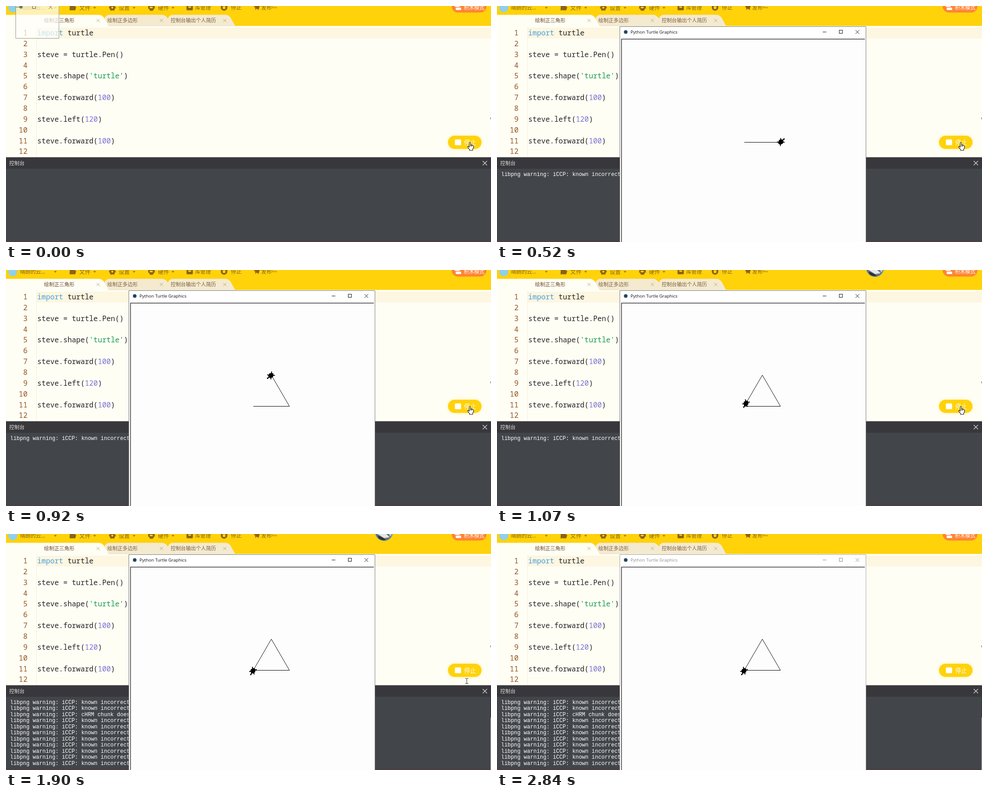
An HTML page with a canvas that plays this animation: 1072 by 522 pixels, repeating every 2940 ms.

```html
<!DOCTYPE html>
<html lang="zh-CN">
<head>
<meta charset="utf-8">
<title>Turtle triangle</title>
<style>
html, body { margin: 0; width: 100%; height: 100%; overflow: hidden; background: #fffef5; }
canvas { display: block; }
</style>
</head>
<body>
<canvas id="stage" width="1072" height="522"></canvas>
<script>
const ctx = document.getElementById('stage').getContext('2d');
const LOOP = 2940;
const CJK = '"Noto Sans CJK SC", "Noto Sans CJK", sans-serif';
const CODE = '"Noto Sans Mono", monospace';
const TERM = '"Liberation Mono", monospace';
const UI = '"Open Sans", "Noto Sans", sans-serif';
const YELLOW = '#ffd20a', BROWN = '#8b6414', PAPER = '#fffef5';

function rect(x, y, w, h, color) {
  ctx.fillStyle = color;
  ctx.fillRect(x, y, w, h);
}

function pill(x, y, w, h, r, color) {
  ctx.fillStyle = color;
  ctx.beginPath();
  ctx.roundRect(x, y, w, h, r);
  ctx.fill();
}

function disc(x, y, r, color) {
  ctx.fillStyle = color;
  ctx.beginPath();
  ctx.arc(x, y, r, 0, Math.PI * 2);
  ctx.fill();
}

function poly(points, color) {
  ctx.fillStyle = color;
  ctx.beginPath();
  points.forEach(([x, y]) => ctx.lineTo(x, y));
  ctx.closePath();
  ctx.fill();
}

function stroke(points, color, width = 1) {
  ctx.strokeStyle = color;
  ctx.lineWidth = width;
  ctx.beginPath();
  points.forEach(([x, y], i) => i ? ctx.lineTo(x, y) : ctx.moveTo(x, y));
  ctx.stroke();
}

function text(str, x, y, size, font, color, align = 'left') {
  ctx.font = `${size}px ${font}`;
  ctx.textAlign = align;
  ctx.fillStyle = color;
  ctx.fillText(str, x, y);
}

// Chinese label centred on the line y
function label(str, x, y, size, color) {
  text(str, x, y + size * 0.38, size, CJK, color);
}

function cross(x, y, r, color, width = 1) {
  stroke([[x - r, y - r], [x + r, y + r]], color, width);
  stroke([[x + r, y - r], [x - r, y + r]], color, width);
}

function caret(x) {
  poly([[x - 3, 2.5], [x + 3, 2.5], [x, 5.8]], BROWN);
}

function drawIcons() {
  poly([[141, -2], [146, -2], [148, 0], [153, 0], [153, 2], [155.5, 2], [153, 9.5], [140.5, 9.5]], BROWN);

  for (let i = 0; i < 6; i++) {
    const a = i * Math.PI / 3;
    disc(235 + 5 * Math.cos(a), 3.5 + 5 * Math.sin(a), 2.5, BROWN);
  }
  disc(235, 3.5, 5.5, BROWN);
  disc(235, 3.5, 2.3, YELLOW);

  pill(314, -1, 15, 8, 4, BROWN);
  pill(317, 2, 9, 8.5, 3, BROWN);
  pill(317.5, 1.5, 7, 3.5, 1.7, YELLOW);

  pill(399, -4, 14, 13.5, 2, BROWN);
  poly([[402, 1], [410, 1], [408, 4], [404, 4]], YELLOW);

  disc(482, 3.2, 7.3, BROWN);
  pill(479, 0.5, 6, 6, 1, YELLOW);

  poly([[548, 1], [562, -4], [558, 9], [554, 5.5], [551, 9], [551, 4]], BROWN);
}

function drawHeader(withPhoto) {
  rect(0, 0, 1072, 44, YELLOW);
  disc(15, 4, 10, '#8fd0ea');
  label('晴朗的云...', 31, 4, 11.6, BROWN);
  label('文件', 162, 4, 12.4, BROWN);
  label('设置', 249, 4, 12.2, BROWN);
  label('硬件', 336, 4, 12.2, BROWN);
  label('库管理', 418, 4, 11.6, BROWN);
  label('停止', 497, 4, 11.8, BROWN);
  label('发布', 564, 4, 11.6, BROWN);
  text('Beta', 587, 5, 5.5, UI, BROWN);
  [109, 196, 283, 369].forEach(caret);
  drawIcons();

  pill(985, -14, 77, 28.5, 14, '#ff8534');
  pill(992, -4, 11, 6, 1.5, '#fff');
  pill(994, 3.5, 12, 5.5, 1.5, '#fff');
  label('积木模式', 1012, 4, 11.4, '#fff');

  if (withPhoto) drawPhoto();
}

function drawPhoto() {
  ctx.save();
  ctx.beginPath();
  ctx.arc(835.5, -4.5, 19, 0, Math.PI * 2);
  ctx.clip();
  rect(815, -25, 41, 41, '#70747a');
  poly([[818, -2], [832, -8], [848, 7], [836, 9]], '#e4e6e8');
  poly([[822, 3], [834, 9], [844, 16], [824, 14]], '#2c3036');
  poly([[842, -6], [856, -4], [850, 6]], '#c4c7ca');
  ctx.restore();
  ctx.strokeStyle = '#3d7cb5';
  ctx.lineWidth = 1.5;
  ctx.beginPath();
  ctx.arc(835.5, -4.5, 18.8, 0, Math.PI * 2);
  ctx.stroke();
}

// lean: how far the left edge slants inwards at the top
function drawTab(x, right, lean, color) {
  ctx.fillStyle = color;
  ctx.beginPath();
  ctx.moveTo(x, 45);
  ctx.lineTo(x + lean * 0.7, 27);
  ctx.quadraticCurveTo(x + lean, 19.5, x + lean * 1.4, 19.5);
  ctx.lineTo(right - 22, 19.5);
  ctx.quadraticCurveTo(right - 14, 19.5, right - 10, 27);
  ctx.lineTo(right, 45);
  ctx.fill();
}

function drawTabs() {
  drawTab(348, 507, 14, '#f4ead0');
  drawTab(208, 367, 14, '#f4ead0');
  drawTab(0, 227, 0, PAPER);
  label('绘制正三角形', 84, 32, 11.2, '#6b4a2a');
  label('绘制正多边形', 224, 32, 11.2, '#7a5f40');
  label('控制台输出个人简历', 364, 32, 11.15, '#7a5f40');
  [203, 343, 483].forEach(x => cross(x + 0.5, 32, 3.5, '#b3a48c'));
}

const INK = '#252525', BLUE = '#45a0e0', GREEN = '#169c4c', VIOLET = '#7a72d2';
const program = [
  [['import', BLUE], [' turtle', INK]], [],
  [['steve = turtle.Pen()', INK]], [],
  [['steve.shape(', INK], ["'turtle'", GREEN], [')', INK]], [],
  [['steve.forward(', INK], ['100', VIOLET], [')', INK]], [],
  [['steve.left(', INK], ['120', VIOLET], [')', INK]], [],
  [['steve.forward(', INK], ['100', VIOLET], [')', INK]], []
];

function drawEditor() {
  rect(0, 44, 1072, 291, PAPER);
  rect(68, 48, 1004, 23.5, '#fdf6e0');
  rect(67, 45, 1, 290, '#f5efd8');
  program.forEach((parts, i) => {
    const y = 65 + i * 23.85;
    text(i + 1, 47.5, y, 15.95, CODE, '#96541c', 'right');
    let x = 69;
    for (const [str, color] of parts) {
      text(str, x, y, 15.95, CODE, color);
      x += ctx.measureText(str).width;
    }
  });
  disc(1076, 248.5, 5, '#333');
}

function drawButton() {
  ctx.save();
  ctx.shadowColor = 'rgba(255,210,10,.4)';
  ctx.shadowBlur = 6;
  pill(977, 287, 74, 29, 14.5, YELLOW);
  ctx.restore();
  pill(992, 295, 14, 13, 2.5, '#fff');
  label('停止', 1012.5, 302, 13.2, '#fff');
}

function drawConsole(lines) {
  rect(0, 334.5, 1072, 26, '#38383c');
  rect(0, 360, 1072, 162, '#424549');
  rect(0, 519, 1072, 3, '#493f45');
  label('控制台', 7, 348, 11.4, '#dcdcdc');
  cross(1058.5, 347.5, 4.8, '#d4d4d4', 1.3);
  for (let i = 0; i < lines; i++) {
    const tail = i === 2 ? 'cHRM chunk does not match sRGB' : 'known incorrect sRGB profile';
    text('libpng warning: iCCP: ' + tail, 9, 375.5 + i * 13.53, 11.93, TERM, '#fff');
  }
  if (lines > 1) {
    rect(1071, 360, 1, 46, '#2f3134');
    rect(1071, 406, 1, 116, '#c4c6c8');
  }
}

function windowButtons(x, y, gap, color) {
  rect(x - 4, y, 8, 1, color);
  ctx.strokeStyle = color;
  ctx.lineWidth = 1;
  ctx.strokeRect(x + gap - 3.5, y - 3.5, 7, 7);
  cross(x + 2 * gap + 0.5, y + 0.5, 4, color);
}

function drawSmallWindow(alpha) {
  ctx.save();
  ctx.globalAlpha = alpha;
  rect(21, 0, 97, 72, '#fffffa');
  stroke([[21.5, 0], [21.5, 71.5], [117, 71.5], [117, 0]], '#666');
  disc(33, 2, 3.6, '#24465a');
  windowButtons(26, 2, 36, '#222');
  ctx.restore();
}

const CORNERS = [[546.5, 301.5], [626.5, 301.5], [586.5, 232.5], [546.5, 301.5]];
const HALF_SHELL = [
  [0, 16], [2, 14], [1, 10], [4, 7], [7, 9], [9, 8], [6, 5],
  [7, 1], [5, -3], [8, -6], [6, -8], [4, -5], [0, -7]
];
const SHELL = HALF_SHELL.concat(HALF_SHELL.slice(1, -1).reverse().map(([x, y]) => [-x, y]));

// sides: triangle sides walked so far
function drawTurtle(sides, heading) {
  const whole = Math.min(Math.floor(sides), 2), part = sides - whole;
  const [ax, ay] = CORNERS[whole], [bx, by] = CORNERS[whole + 1];
  const x = ax + (bx - ax) * part, y = ay + (by - ay) * part;
  stroke(CORNERS.slice(0, whole + 1).concat([[x, y]]), '#000');
  ctx.save();
  ctx.translate(x, y);
  ctx.rotate((90 - heading) * Math.PI / 180);
  ctx.scale(0.8, -0.8);
  poly(SHELL, '#000');
  ctx.restore();
}

function drawWindow(active) {
  const color = active ? '#111' : '#8c8c8c';
  rect(271, 45, 545, 477, '#fff');
  stroke([[271.5, 522], [271.5, 45.5], [815.5, 45.5], [815.5, 522]], active ? '#777' : '#a5a5a5');
  rect(274, 72, 539, 450, '#a0a0a0');
  rect(275, 73, 538, 449, '#333');
  rect(276, 74, 537, 448, '#fdfdfd');
  disc(284.5, 57.5, 4, '#24465a');
  text('Python Turtle Graphics', 295, 61.3, 9.8, UI, color);
  windowButtons(724, 57, 36, color);
}

function drawHand() {
  const path = new Path2D('M1024 303Q1025.5 300.5 1027 303V307.5Q1028.5 306.5 1029.5 308' +
    'Q1031 307.2 1031.8 308.8Q1033.5 308.5 1033.4 310.5V313.5L1031.5 317V319.3H1024.5V317.5' +
    'L1020.8 312.5Q1020.3 310 1022 310.5L1024 312Z');
  ctx.fillStyle = '#fff';
  ctx.fill(path);
  ctx.strokeStyle = '#111';
  ctx.lineWidth = 1.1;
  ctx.stroke(path);
  stroke([[1027, 307.5], [1027, 311]], '#111');
  stroke([[1029.5, 308], [1029.5, 311]], '#111');
}

function drawBeam(x, y) {
  const color = y < 334 ? '#333' : '#e6e6e6';
  rect(x, y - 5, 1, 11, color);
  rect(x - 3, y - 6, 3, 1, color);
  rect(x + 1, y - 6, 3, 1, color);
  rect(x - 3, y + 5, 3, 1, color);
  rect(x + 1, y + 5, 3, 1, color);
}

// [start, sides walked, heading]
const walk = [
  [520, 1, 43], [650, 1, 120], [800, 2, 120], [920, 2, 220], [1070, 2 + 8 / 9, 240], [1220, 3, 240]
];
// [start, x, y]
const beam = [[1900, 1018, 325], [2020, 1018, 371], [2170, 1014, 428], [2290, 1016, 484], [2440, 1035, 513]];

const current = (steps, t) => steps.filter(s => s[0] <= t).pop();

function draw(t) {
  drawHeader(t >= 1070 && t < 2840);
  drawEditor();
  drawTabs();
  drawButton();
  drawConsole(t < 150 ? 0 : t < 1220 ? 1 : 11);

  if (t < 520) {
    drawSmallWindow(t < 150 ? 0.7 : 1);
  } else {
    drawWindow(t < 2840);
    const [, sides, heading] = current(walk, t);
    drawTurtle(sides, heading);
  }

  if (t < 1900) {
    drawHand();
  } else if (t < 2560) {
    const [, x, y] = current(beam, t);
    drawBeam(x, y);
  }
}

const start = performance.now();
function tick() {
  draw((performance.now() - start) % LOOP);
  requestAnimationFrame(tick);
}
tick();
</script>
</body>
</html>
```
